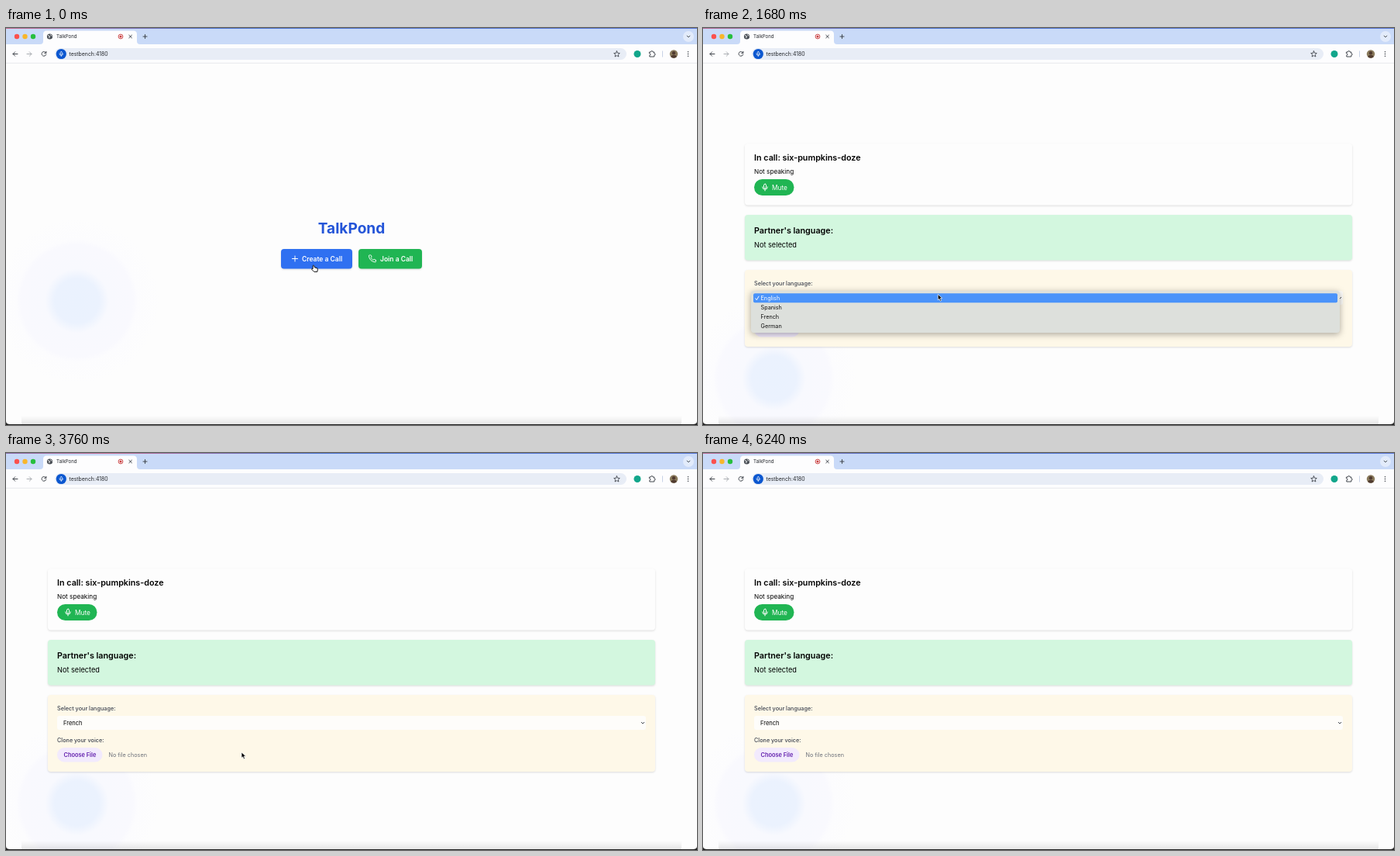
These frames come from a looping animation (892 px wide and 512 px high, 6.32 s). An HTML page:

```html
<!DOCTYPE html>
<html lang="en">
<head>
<meta charset="utf-8">
<title>TalkPond</title>
<style>
  html, body { margin: 0; width: 100%; height: 100%; overflow: hidden; background: #fdfdfd; }
  svg { display: block; width: 100vw; height: 100vh; }
  text { font-family: Inter, "Open Sans", sans-serif; font-size: 7.25px; white-space: pre; }
  .h { font-size: 10.75px; font-weight: 600; }
  .b { font-size: 8.5px; font-weight: 600; fill: #fff; }
  .label { font-weight: 500; fill: #3d4350; }
  .icon { fill: none; stroke: #41464d; stroke-linecap: round; stroke-linejoin: round; }
  .white { stroke: #fff; }
  .card { filter: drop-shadow(0 1.6px 1.3px #0002); }
  .menu { filter: drop-shadow(0 2px 4px #0005); }
</style>
</head>
<body>
<svg viewBox="0 0 892 512">
  <defs>
    <radialGradient id="calm">
      <stop offset="0" stop-color="#eaf2fe"/>
      <stop offset=".27" stop-color="#ebf2fe"/>
      <stop offset=".39" stop-color="#f8f9fe"/>
      <stop offset=".68" stop-color="#f9f9fe"/>
      <stop offset=".74" stop-color="#fcfcfe"/>
      <stop offset="1" stop-color="#fdfdfd"/>
    </radialGradient>
    <radialGradient id="loud">
      <stop offset="0" stop-color="#c2d8fd"/>
      <stop offset=".28" stop-color="#cbddfd"/>
      <stop offset=".52" stop-color="#e2ecfe"/>
      <stop offset=".78" stop-color="#f4f7fe"/>
      <stop offset="1" stop-color="#fdfdfd" stop-opacity="0"/>
    </radialGradient>
    <linearGradient id="shade" x2="0" y2="1">
      <stop offset="0" stop-color="#000" stop-opacity="0"/>
      <stop offset="1" stop-color="#000" stop-opacity=".1"/>
    </linearGradient>
    <linearGradient id="edge" gradientUnits="userSpaceOnUse" x1="0" x2="892" spreadMethod="reflect">
      <stop offset="0" stop-color="#c4698c"/>
      <stop offset=".3" stop-color="#4d74cf"/>
      <stop offset="1" stop-color="#5b78d6"/>
    </linearGradient>
    <g id="mic">
      <rect x="-1.5" y="-4.3" width="3" height="5.6" rx="1.5"/>
      <path d="M-3.3-.6a3.3 3.3 0 0 0 6.6 0M0 2.7V4.4"/>
    </g>
    <path id="chevron" d="M-1.8-.9 0 .9 1.8-.9"/>
  </defs>

  <rect width="892" height="512" fill="#fdfdfd"/>
  <g id="blob">
    <circle r="106" fill="url(#calm)"/>
    <circle id="glow" r="100" fill="url(#loud)"/>
  </g>

  <g id="home">
    <text x="446" y="265" text-anchor="middle" style="font-size:19.1px;font-weight:700" fill="#2455d8">TalkPond</text>
    <g class="card">
      <rect x="355" y="285" width="92" height="25.500" rx="4" fill="#2f70f1"/>
      <rect x="455" y="285" width="82" height="25.500" rx="4" fill="#20b553"/>
    </g>
    <path class="icon white" d="M369.500 297.500h7M373 294v7"/>
    <text class="b" x="382" y="301">Create a Call</text>
    <path class="icon white" transform="translate(467.500 292) scale(.45)" stroke-width="2"
      d="M22 17v3a2 2 0 0 1-2 2A19 19 0 0 1 2 4a2 2 0 0 1 2-2h3a2 2 0 0 1 2 2l1 3-2 3a16 16 0 0 0 6 6l3-2 3 1a2 2 0 0 1 2 2z"/>
    <text class="b" x="483" y="301">Join a Call</text>
  </g>

  <g id="call">
    <rect class="card" x="54" y="149" width="784" height="79.500" rx="4" fill="#fdfdfd"/>
    <text class="h" x="66" y="171">In call: six-pumpkins-doze</text>
    <text id="status" x="66" y="187.600" style="font-size:8.2px"></text>
    <rect x="66" y="195" width="51.500" height="21" rx="10.500" fill="#20b553"/>
    <use href="#mic" class="icon white" x="80" y="205.500"/>
    <text x="89" y="208.600" style="font-size:8.3px" fill="#fff">Mute</text>

    <rect class="card" x="54" y="241" width="784" height="58.500" rx="4" fill="#d3f7df"/>
    <text class="h" x="66" y="264.600">Partner's language:</text>
    <text x="66" y="283" style="font-size:9.2px">Not selected</text>

    <rect class="card" x="54" y="312" width="784" height="99" rx="4" fill="#fef8e8"/>
    <text class="label" x="66" y="332.200">Select your language:</text>
    <rect x="66" y="339" width="760" height="18" rx="3" fill="#fefdfa"/>
    <text id="choice" x="74" y="350.800" style="font-size:7.5px"></text>
    <use href="#chevron" class="icon" x="822" y="348.200"/>
    <text class="label" x="66" y="373">Clone your voice:</text>
    <rect x="66" y="380" width="58.500" height="18.500" rx="9.200" fill="#f2eafd"/>
    <text x="74.500" y="392" style="font-size:7.4px;font-weight:600" fill="#6422ae">Choose File</text>
    <text x="132.500" y="392" fill="#6d717a">No file chosen</text>

    <g id="menu">
      <rect class="menu" x="62" y="339" width="760" height="54" rx="4" fill="#dde0dc"/>
      <rect id="bar" x="65" width="754" height="12" rx="2" fill="#4a93fa"/>
      <path id="tick" class="icon" d="M67.800 348.800l1.500 1.900 2.700-4.600"/>
    </g>
    <g id="tip">
      <rect x="303.300" y="396.300" width="46.500" height="10.500" fill="#dedfdb" stroke="#b4b4ae" stroke-width=".6"/>
      <text x="306.800" y="403.300" style="font-size:5.800px" fill="#222">No file chosen</text>
    </g>
  </g>

  <rect x="20" y="500" width="852" height="12" fill="url(#shade)"/>
  <path d="M0 507q0 4 5 4h882q5 0 5-4v5H0z" fill="#222"/>

  <!-- browser frame -->
  <g>
    <rect width="892" height="22" fill="#c9daf8"/>
    <rect id="top" width="892" height="1" fill="url(#edge)"/>
    <path d="M44 21q4 0 4-4V8q0-4.500 4.500-4.500h112q4.500 0 4.500 4.500v9q0 4 4 4h719v24H0V21z" fill="#fdfdfe"/>
    <path d="M0 45.300h892" stroke="#e2e5ea" stroke-width=".8"/>
    <circle cx="14" cy="11" r="3.200" fill="#fb514d"/>
    <circle cx="24.500" cy="11" r="3.200" fill="#f8b62c"/>
    <circle cx="35" cy="11" r="3.200" fill="#27bf3e"/>
    <circle cx="56.500" cy="11" r="3.600" fill="#4b5057"/>
    <path d="M54 9.500l2.500 1.200-1 2.300M57.500 8.500l1.500 2" stroke="#fff" fill="none"/>
    <text x="65" y="13.300" style="font-size:6.100px" fill="#24272c">TalkPond</text>
    <circle cx="148" cy="11" r="2.900" fill="none" stroke="#c93a3c" stroke-width=".9"/>
    <circle cx="148" cy="11" r="1.500" fill="#c93a3c"/>
    <path class="icon" d="M158.800 9.200l3.600 3.600m0-3.600l-3.600 3.600M177 11h5m-2.500-2.500v5"/>
    <circle cx="881" cy="11" r="7" fill="#e2ebfb"/>
    <use href="#chevron" class="icon" x="881" y="11"/>

    <rect x="63" y="26" width="738" height="15" rx="7.500" fill="#e8edf6"/>
    <path class="icon" d="M15 33.500H9m2.700-2.700L9 33.500l2.700 2.700"/>
    <path class="icon" style="stroke:#a9adb2" d="M27 33.500h6m-2.700-2.700l2.700 2.700-2.700 2.700"/>
    <path class="icon" d="M51.600 32a2.900 2.900 0 1 0 .2 2.200M51.900 30.300V32.400h-2.100"/>
    <circle cx="71.300" cy="33.500" r="6.600" fill="#0b57d0"/>
    <use href="#mic" class="icon white" transform="translate(71.300 33.500) scale(.7)"/>
    <text x="81.500" y="36" style="font-size:6.900px" fill="#24272c">testbench:4180</text>
    <path class="icon" stroke-width=".9" d="M788.500 29.800l1.100 2.500 2.700.2-2 1.800.6 2.700-2.400-1.400-2.400 1.400.6-2.700-2-1.800 2.700-.2z"/>
    <circle cx="815" cy="33.500" r="4.500" fill="#12a68b"/>
    <path class="icon" d="M830.800 31h1.700q0-1.500 1.200-1.500T835 31h1.800v1.800q1.300 0 1.300 1.200t-1.300 1.200v1.800h-6v-1.800q1.300-.2 1.300-1.200t-1.300-1.200z"/>
    <path d="M847.500 29.500v8" stroke="#c8d3e6"/>
    <circle cx="862" cy="33.500" r="5.200" fill="#8a7a5c"/>
    <path d="M858.200 37q.6-2.200 3.800-2.200t3.800 2.200a5.200 5.200 0 0 1-7.600 0z" fill="#503b30"/>
    <circle cx="862" cy="32.300" r="2.200" fill="#503b30"/>
    <g fill="#41464d"><circle cx="880.500" cy="30.700" r=".8"/><circle cx="880.500" cy="33.500" r=".8"/><circle cx="880.500" cy="36.300" r=".8"/></g>
  </g>

  <g id="cursor">
    <path id="arrow" d="M0 0v7.300l1.700-1.500 1.300 2.900 1.400-.6-1.300-2.900 2.400-.2z" fill="#000" stroke="#fff" stroke-width=".7"/>
    <path id="hand" d="M-.8.300q1-1 1.500.3l.8 2.300 2.500.5q1.400.4 1.300 1.800l-.5 3.200H.7L-2.400 5.200q-.2-1.300 1.500-.6z" fill="#fff" stroke="#111" stroke-width="1"/>
  </g>
</svg>

<script>
const LOOP = 6320, STEP = 80;
const el = id => document.getElementById(id);
const show = (id, on) => el(id).style.display = on ? '' : 'none';
const langs = ['English', 'Spanish', 'French', 'German'];

const items = langs.map((name, i) => {
  const item = document.createElementNS('http://www.w3.org/2000/svg', 'text');
  item.setAttribute('x', 74.5);
  item.setAttribute('y', 351 + 12 * i);
  item.textContent = name;
  el('menu').append(item);
  return item;
});

// Pointer path: time, x, y
const path = [
  [0, 397, 306], [400, 397, 306], [880, 330, 378], [1360, 304, 342], [1840, 303, 344],
  [2240, 301.5, 363], [2480, 302, 367], [3120, 302, 367],
  [3680, 304, 386], [5680, 304, 386], [6080, 330, 520], [LOOP, 330, 520]
];

const ease = (t, a, b) => {
  const p = Math.min(1, Math.max(0, (t - a) / (b - a)));
  return p * p * (3 - 2 * p);
};

function pointer(t) {
  const i = path.findIndex(p => p[0] > t);
  const [t0, x0, y0] = path[i - 1], [t1, x1, y1] = path[i];
  const p = ease(t, t0, t1);
  return [x0 + (x1 - x0) * p, y0 + (y1 - y0) * p];
}

function highlight(t) {
  if (t < 2080) return 0;
  if (t < 2400) return 1;
  return t >= 3040 && t < 3120 ? -1 : 2;
}

function draw(t) {
  const inCall = t >= 400;
  show('home', !inCall);
  show('call', inCall);

  el('blob').setAttribute('transform', `translate(91.500 ${inCall ? 452 : 352})`);
  const voice = ease(t, 4960, 5440) * (1 - ease(t, 5600, 6160));
  el('glow').setAttribute('opacity', voice);
  el('glow').setAttribute('r', 74 + 26 * voice);

  el('status').textContent = t >= 5040 && t < 5920 ? 'Speaking...' : 'Not speaking';
  el('choice').textContent = langs[t < 3200 ? 0 : 2];

  const row = highlight(t);
  show('menu', t >= 1680 && t < 3280);
  el('menu').setAttribute('opacity', t < 3200 ? 1 : .4);
  show('bar', row >= 0);
  el('bar').setAttribute('y', 342.2 + 12 * row);
  items.forEach((item, i) => item.setAttribute('fill', i === row ? '#fff' : '#111'));
  el('tick').style.stroke = row ? '#111' : '#fff';

  show('tip', t >= 5040 && t < 5760);
  el('cursor').setAttribute('transform', `translate(${pointer(t)})`);
  show('hand', !inCall);
  show('arrow', inCall);
  el('edge').setAttribute('gradientTransform', `translate(${140 * Math.sin(t / LOOP * 4 * Math.PI)})`);
}

function frame() {
  const t = performance.now() % LOOP;
  draw(Math.floor(t / STEP) * STEP);
  requestAnimationFrame(frame);
}
frame();
</script>
</body>
</html>
```
